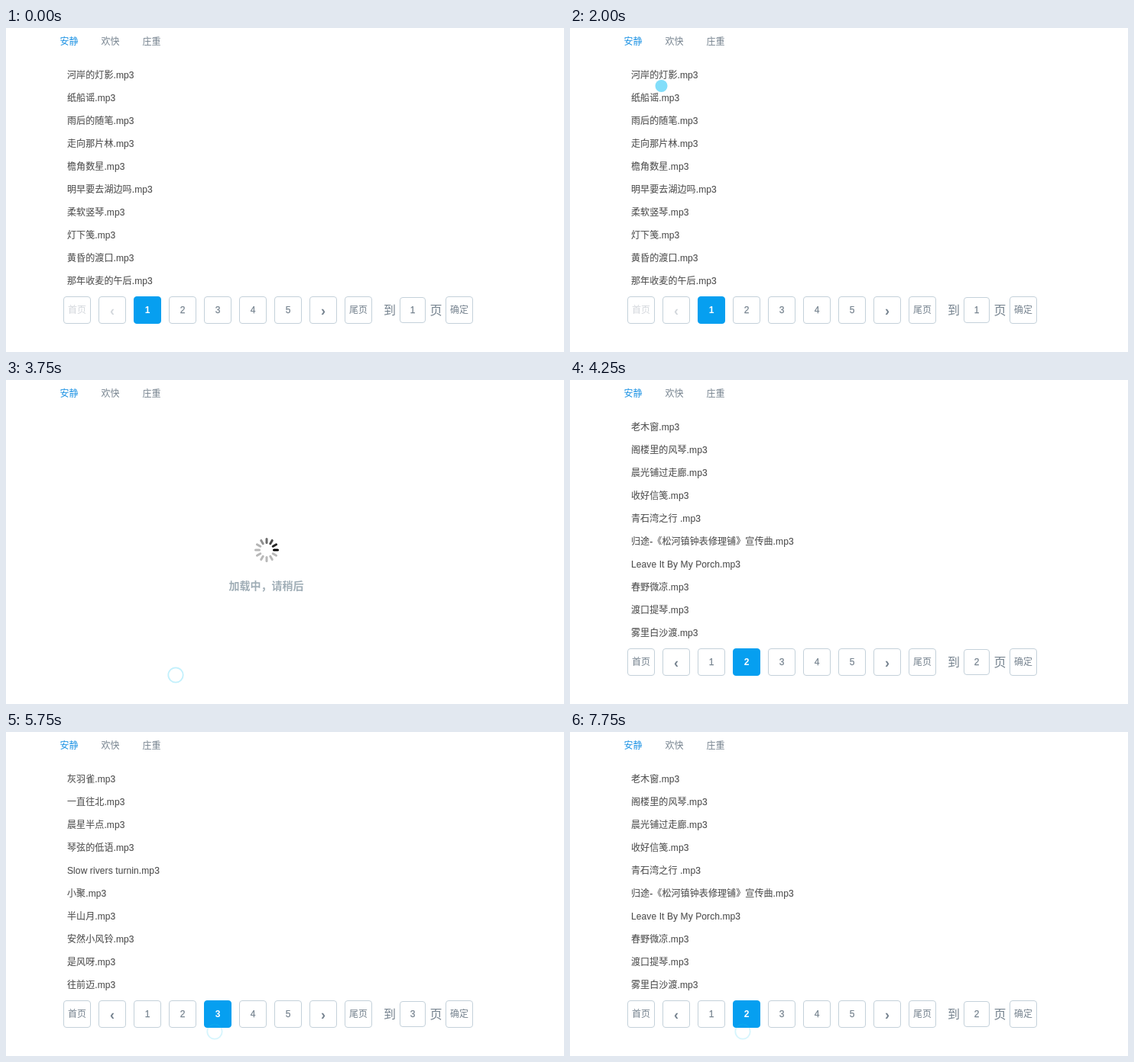
An HTML page that plays this animation: 730x425 px, repeating every 8 s.

```html
<!DOCTYPE html>
<html lang="zh-CN">
<head>
<meta charset="utf-8">
<style>
html, body { margin: 0; width: 100%; height: 100%; overflow: hidden; background: #fff; }
svg { display: block; font: 12px "Liberation Sans", "Noto Sans CJK SC", "Noto Sans CJK", sans-serif; fill: #76838f; }
.mid { text-anchor: middle; }
.song { fill: #505050; stroke: #505050; stroke-width: .1px; letter-spacing: .1px; }
.tab { fill: #1e93e4; }
.box { fill: #fff; stroke: #c4d1da; }
.hover { fill: #f4f5f6; }
.active { fill: #069ff0; stroke: #069ff0; }
.num { stroke: #76838f; stroke-width: .25px; }
.on { fill: #fff; font-weight: bold; }
.off { fill: #d3d7dc; }
.arrow { font-size: 18px; font-weight: bold; }
.big { font-size: 16px; }
.wait { font-size: 14px; font-weight: bold; fill: #9fadb6; }
.cursor { fill: #1cc2f5; opacity: .55; }
.ring { fill: none; stroke: #1cc8f5; stroke-width: 1.8; }
</style>
</head>
<body>
<svg width="730" height="425" viewBox="0 0 730 425"></svg>
<script>
const STEP = 250, LOOP = 8000;
const LEFT = 75, TOP = 352, SIZE = 36, PITCH = 46;
const svg = document.querySelector('svg');

const pages = [
  ['河岸的灯影', '纸船谣', '雨后的随笔', '走向那片林', '檐角数星', '明早要去湖边吗', '柔软竖琴', '灯下笺', '黄昏的渡口', '那年收麦的午后'],
  ['老木窗', '阁楼里的风琴', '晨光铺过走廊', '收好信笺', '青石湾之行 ', '归途-《松河镇钟表修理铺》宣传曲', 'Leave It By My Porch', '春野微凉', '渡口提琴', '雾里白沙渡'],
  ['灰羽雀', '一直往北', '晨星半点', '琴弦的低语', 'Slow rivers turnin', '小聚', '半山月', '安然小风铃', '是风呀', '往前迈']
];

// The pointer follows each path from start to stop and is gone at end;
// a path that finishes on the pager ends with a click.
const gestures = [
  { start: 750, stop: 2750, end: 3000, path: [[108, 33], [118, 97], [111, 42], [128, 110], [187, 282]] },
  { start: 3250, stop: 3500, end: 3750, path: [[212, 345], [226, 367]] },
  { start: 4500, stop: 5250, end: 5500, path: [[232, 369], [277, 373]] },
  { start: 6250, stop: 7000, end: 7500, path: [[277, 373], [230, 373]] }
];

function pointerAt(t) {
  const g = gestures.find(g => t >= g.start && t < g.end);
  if (!g) return null;
  const pos = Math.min(1, (t - g.start) / (g.stop - g.start)) * (g.path.length - 1);
  const i = Math.floor(pos), from = g.path[i], to = g.path[i + 1] ?? from;
  return from.map((v, axis) => v + (to[axis] - v) * (pos - i));
}

function lastClick(t) {
  const g = gestures.findLast(g => g.end <= t && g.path.at(-1)[1] > TOP);
  if (!g) return { page: 1, age: Infinity };
  const [x, y] = g.path.at(-1);
  return { x, y, age: t - g.end, page: Math.round((x - LEFT - SIZE / 2) / PITCH) - 1 };
}

const text = (x, y, str, cls = '') => `<text x="${x}" y="${y}" class="${cls}" xml:space="preserve">${str}</text>`;
const box = (x, y, size, cls = '') =>
  `<rect x="${x + .5}" y="${y + .5}" width="${size - 1}" height="${size - 1}" rx="3.5" class="box ${cls}"/>`;

function spinner(t) {
  const head = Math.floor(t / 83) + 6;
  let out = '';
  for (let i = 0; i < 12; i++) {
    const grey = Math.min(184, (head - i) % 12 * 36);
    out += `<path d="M0-9.5V-14.5" stroke="rgb(${grey},${grey},${grey})" stroke-width="3" stroke-linecap="round"
      transform="translate(341 223) rotate(${i * 30})"/>`;
  }
  return out + text(340.5, 275, '加载中，请稍后', 'mid wait');
}

function pager(page, pointer) {
  const labels = ['首页', '‹', 1, 2, 3, 4, 5, '›', '尾页'];
  let out = labels.map((label, i) => {
    const x = LEFT + PITCH * i;
    const active = label === page;
    const hover = pointer && pointer[1] > TOP && pointer[0] >= x && pointer[0] <= x + SIZE;
    const arrow = label === '‹' || label === '›';
    const cls = ['mid', active ? 'on' : page === 1 && i < 2 ? 'off' : '', arrow ? 'arrow' : '',
      label > 0 && !active ? 'num' : ''].join(' ');
    return box(x, TOP, SIZE, active ? 'active' : hover ? 'hover' : '') +
      text(x + SIZE / 2, arrow ? 377 : 374, label, cls);
  }).join('');
  out += text(502, 376, '到', 'mid big') + box(515, 353, 34) + text(532, 374, page, 'mid num');
  return out + text(562.5, 376, '页', 'mid big') + box(575, TOP, SIZE) + text(593, 374, '确定', 'mid');
}

function scene(t) {
  const pointer = pointerAt(t);
  const { x, y, age, page } = lastClick(t);

  let out = ['安静', '欢快', '庄重'].map((name, i) => text(70.5 + 54 * i, 22, name, i ? '' : 'tab')).join('');
  if (age < STEP) out += spinner(t);
  else {
    out += pages[page - 1].map((name, i) => text(80, 66 + 30 * i, name + '.mp3', 'song')).join('');
    out += pager(page, pointer);
  }
  if (pointer) out += `<circle cx="${pointer[0]}" cy="${pointer[1]}" r="8" class="cursor"/>`;
  if (age < 2 * STEP) out += `<circle cx="${x - 4}" cy="${y + 20}" r="9.7" class="ring" opacity="${age ? .18 : .27}"/>`;
  return out;
}

let shown = -1;
function tick() {
  const t = Math.floor(performance.now() % LOOP / STEP) * STEP;
  if (t !== shown) svg.innerHTML = scene(shown = t);
  requestAnimationFrame(tick);
}
tick();
</script>
</body>
</html>
```
